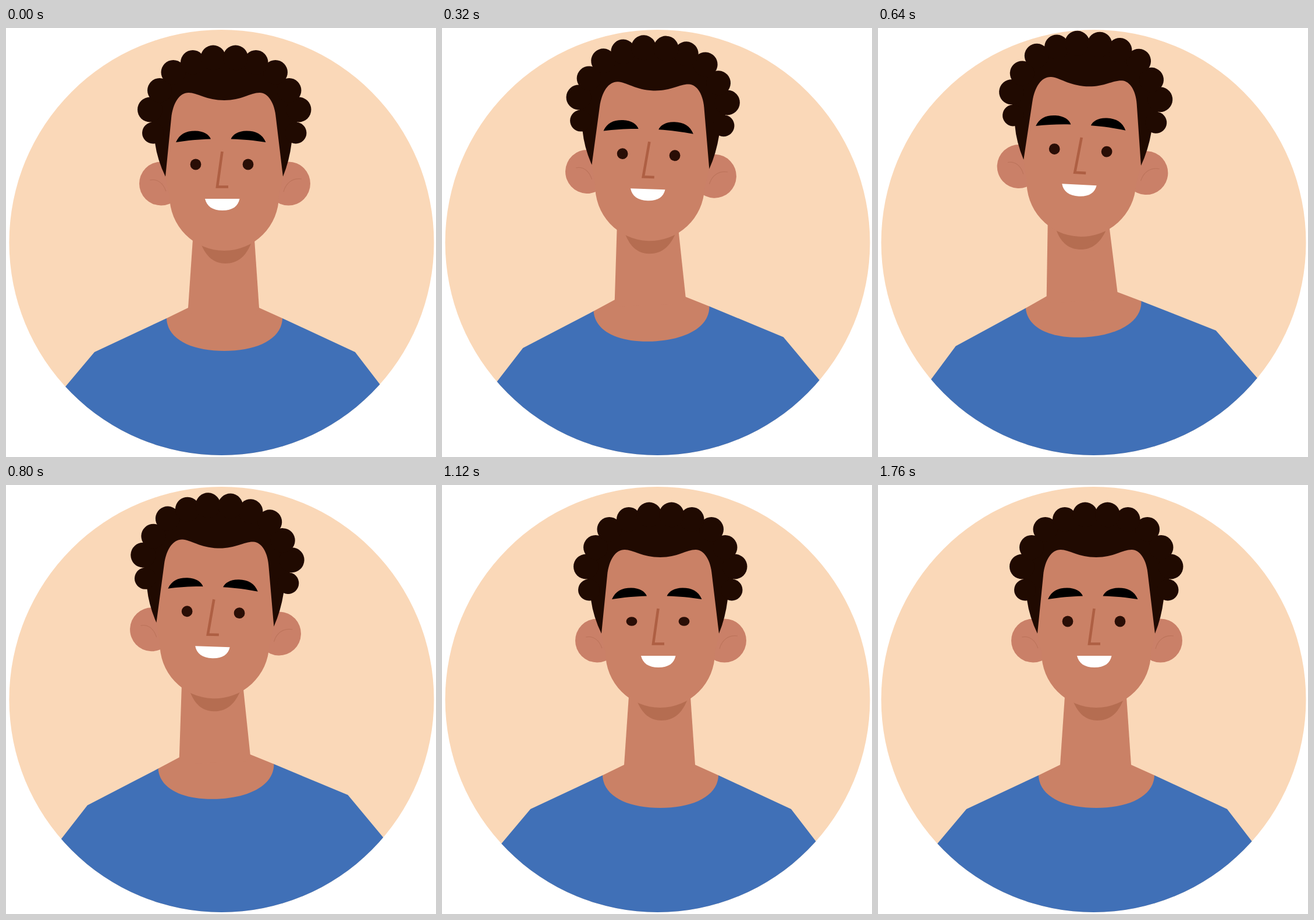
An HTML page for the animation above (1840 ms loop, 739 by 736 pixels).

```html
<!DOCTYPE html>
<html lang="en">
<head>
<meta charset="utf-8">
<title>Nodding man</title>
<style>
  html, body { margin: 0; height: 100%; overflow: hidden; background: #fff; }
  svg { display: block; width: 100vw; height: 100vh; }
  .skin { fill: #ca8166; }
  .hair { fill: #200a01; }
</style>
</head>
<body>
<svg viewBox="0 0 739 736">
  <clipPath id="disc"><circle cx="370.5" cy="368" r="365"/></clipPath>
  <circle cx="370.5" cy="368" r="365" fill="#fad8b8"/>
  <g clip-path="url(#disc)">
    <g id="body">
      <path fill="#4070b7" d="M152 556 276 498H475L600 556 757 760V820H-20V760Z"/>
      <path class="skin" d="M313 480 276 498C277 534 319 554 375 554 431 554 474 534 475 498L435 480Z"/>
    </g>
  </g>
  <path id="neck" class="skin"/>
  <g id="head">
    <path fill="#b56d51" d="M335 370H421C412 392 398 404 377 404 358 404 344 393 335 370Z"/>
    <g fill="#ca8068">
      <circle cx="266.5" cy="267" r="37.5"/>
      <circle cx="485.5" cy="267" r="37.5"/>
    </g>
    <path fill="none" stroke="#bd745c" stroke-width="1.2" d="M247 261C260 258 270 266 275 280M508 259C492 257 481 266 477 281"/>
    <g id="curls" class="hair">
      <path d="M252 180 247 140 264 107 287 77 321 58 356 51H395L429 59 463 77 486 107 504 140 497 180 491 196Q487 228 476 255L440 200H310L274 255Q260 226 256 197Z"/>
    </g>
    <path class="skin" d="M274 255 284 155C287 128 298 111 314 111 328 111 345 124 375 124 405 124 420 111 436 111 450 111 462 128 464 155L476 255 469 288A94 94 0 0 1 281 288Z"/>
    <path id="brow" d="M292 196C298 182 309 176.5 325 176.5 340 176.5 349 183 352 190.5 330 191 312 193 292 196Z"/>
    <use href="#brow" transform="translate(738.5) scale(-1 1)"/>
    <ellipse class="eye" cx="326" cy="234" rx="9.4"/>
    <ellipse class="eye" cx="416" cy="234" rx="9.4"/>
    <path fill="none" stroke="#ae5f43" stroke-width="4.6" d="M371.5 212 363 272.5H382"/>
    <path fill="#fff" d="M342 293H401.5C399 306 389 313 372 313 355 313 345 306 342 293Z"/>
  </g>
</svg>
<script>
const STEP = 80, LOOP = 1840;
const $ = id => document.getElementById(id);
const eyes = document.querySelectorAll('.eye');

// Eye openness by step during each blink; fully open elsewhere
const blink = { 1: 0.4, 2: 0, 3: 0.83, 12: 0.4, 13: 0, 14: 0.83 };

const curls = [[252.5, 180, 18.5], [247.5, 140, 21.5], [264, 107, 21], [287.5, 76, 21], [321, 59, 21], [356, 51, 21.5]];
for (const [x, y, r] of curls) {
  for (const cx of [x, 750.5 - x]) {
    const c = document.createElementNS('http://www.w3.org/2000/svg', 'circle');
    c.setAttribute('cx', cx);
    c.setAttribute('cy', y);
    c.setAttribute('r', r);
    $('curls').append(c);
  }
}

// Shift by (dx, dy) and turn around (cx, cy)
function pose(id, cx, cy, dx, dy, angle) {
  const m = new DOMMatrix().translate(cx + dx, cy + dy).rotate(angle).translate(-cx, -cy);
  $(id).setAttribute('transform', `matrix(${[m.a, m.b, m.c, m.d, m.e, m.f]})`);
  return (x, y) => {
    const p = m.transformPoint({ x, y });
    return `${p.x} ${p.y}`;
  };
}

function draw(step) {
  // Lean out for 550 ms, then back at the same speed
  const lean = Math.max(0, 550 - Math.abs(step * STEP - 550)) / 460;
  const head = pose('head', 375, 267, -24.5 * lean, -24 * lean, 2.9 * lean);
  const body = pose('body', 375, 528, -20.5 * lean, -23.5 * lean, -3.45 * lean);
  $('neck').setAttribute('d', 'M' + [
    head(321, 363), body(313, 480), body(320, 492),
    body(428, 492), body(435, 480), head(427, 363)
  ].join('L') + 'Z');

  const open = blink[step] ?? 1;
  for (const eye of eyes) {
    eye.setAttribute('rx', open ? 9.4 : 6);
    eye.setAttribute('ry', open ? 9.4 * open : 0.8);
    eye.setAttribute('fill', open ? '#2a0e06' : '#b3694f');
  }
}

const start = performance.now();
function frame() {
  draw(Math.floor((performance.now() - start) % LOOP / STEP));
  requestAnimationFrame(frame);
}
frame();
</script>
</body>
</html>
```
